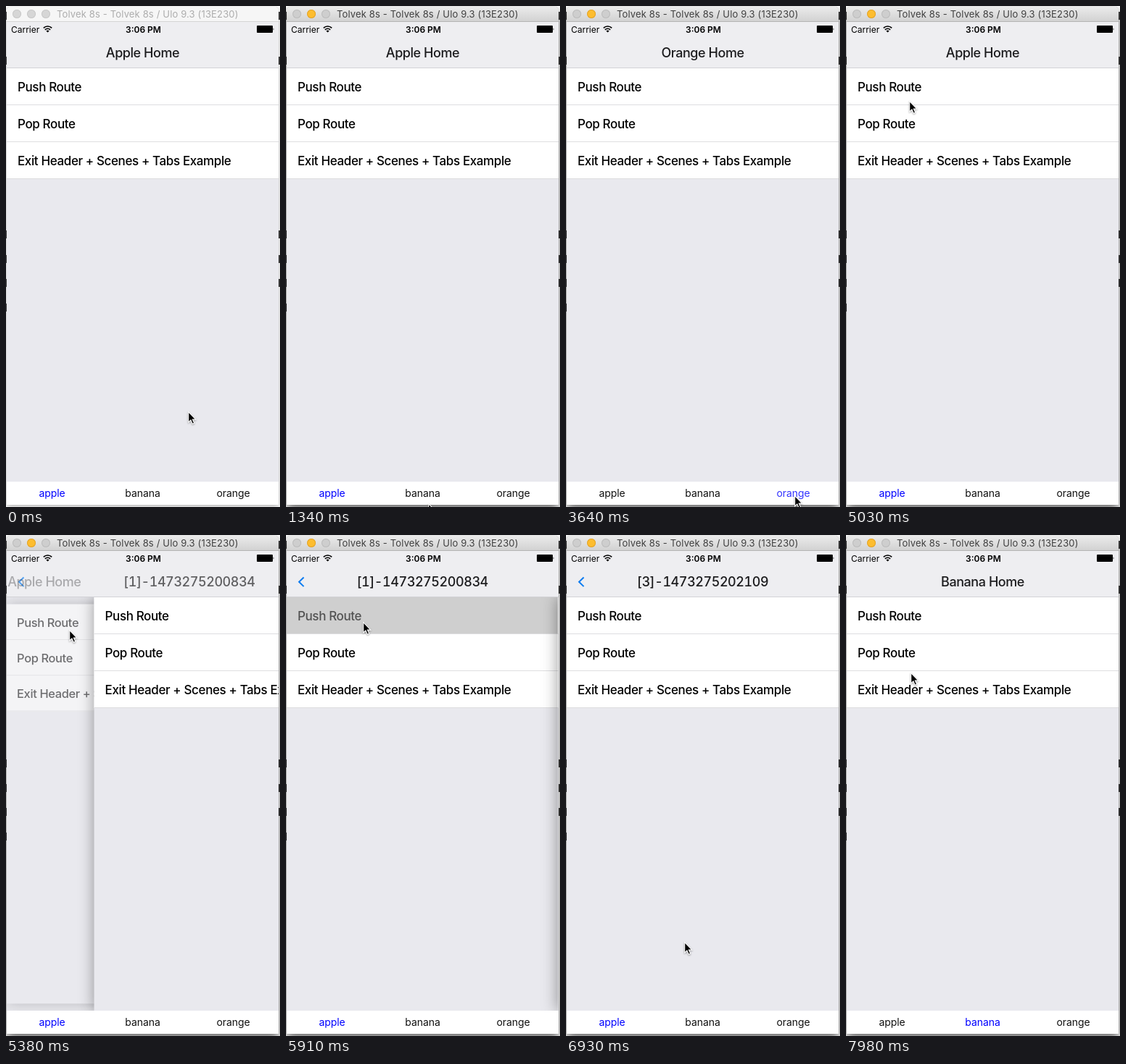
Write an HTML page that moves like this. It is 378 px wide and 692 px high and loops after 8 s.

```html
<!DOCTYPE html>
<html lang="en">
<head>
<meta charset="utf-8">
<style>
html, body { margin: 0; width: 100%; height: 100%; overflow: hidden; background: #fff; }
body { position: relative; font-family: Inter, Roboto, sans-serif; color: #000; }
div, svg { position: absolute; box-sizing: border-box; white-space: nowrap; }
.ink { width: 2px; height: 11px; background: #444; }
#win { left: 1px; top: 1px; width: 375px; height: 688px; border-radius: 5px 5px 0 0;
  box-shadow: 0 0 1px rgba(0,0,0,.4), 0 4px 9px rgba(0,0,0,.25); }
#win.on { box-shadow: 0 0 1px rgba(0,0,0,.55), 0 8px 14px rgba(0,0,0,.55); }
#bar { width: 375px; height: 21px; border-radius: 5px 5px 0 0; background: #f6f6f6;
  border-bottom: 1px solid #d4d4d4; font: 13px/21px Inter, sans-serif; letter-spacing: .15px; color: #acacac; }
.on #bar { background: linear-gradient(#ebebeb, #d2d2d2); border-color: #b4b4b4; color: #3f3f3f; }
#bar b { position: absolute; top: 4px; width: 12px; height: 12px; border-radius: 6px; background: #d6d6d6;
  box-shadow: inset 0 0 0 1px #c9c9c9; }
.on #bar b { background: #cecece; box-shadow: inset 0 0 0 1px #bcbcbc; }
.on #bar b:nth-child(2) { background: #fdbd2f; box-shadow: inset 0 0 0 1px #e2a32a; }
#head { top: 21px; width: 375px; height: 64px; background: #eeeef1; border-bottom: 1px solid #d2d2d6; overflow: hidden; }
.status { top: 0; font-size: 12px; line-height: 21px; }
.title { top: 32px; width: 375px; text-align: center; font: 500 18px/21px Inter, sans-serif;
  font-variant-numeric: tabular-nums; letter-spacing: -.45px; color: #1c1c1e; }
#scenes { top: 85px; width: 375px; height: 571px; overflow: hidden; background: #e9e9ee; }
.card { width: 375px; height: 571px; background: #e9e9ee; box-shadow: 0 0 20px rgba(0,0,0,.4); }
.row { width: 375px; height: 51px; padding: 1px 0 0 15px; background: #fff; border-bottom: 1px solid #dedee0;
  font: 500 17px/51px Inter, sans-serif; letter-spacing: -.38px; }
.row.hit { background: #cfcfcf; color: #525252; }
#tabs { top: 656px; width: 375px; height: 32px; background: #fff; }
.tab { width: 125px; text-align: center; font-size: 14px; line-height: 32px; letter-spacing: -.08px; color: #111; }
#cursor { left: 0; top: 0; overflow: visible; filter: drop-shadow(0 1px 1px rgba(0,0,0,.35)); }
</style>
</head>
<body>
<div id="win">
  <div id="bar"><b style="left:8px"></b><b style="left:28px"></b><b style="left:48px"></b>
    <div style="left:69px">Tolvek 8s - Tolvek 8s / Ulo 9.3 (13E230)</div></div>
  <div id="head">
    <div class="status" style="left:6px">Carrier</div>
    <svg style="left:50px;top:4px" width="13" height="12" fill="none" stroke="#000" stroke-width="1.7">
      <path d="M.8 4.4a8 8 0 0 1 11.4 0M2.9 6.8a5 5 0 0 1 7.2 0"/><path d="M6.5 10.6L4.4 8.5a3 3 0 0 1 4.2 0z" fill="#000" stroke="none"/></svg>
    <div class="status" style="left:1px;width:375px;text-align:center;font-weight:600">3:06 PM</div>
    <svg style="left:345px;top:5px" width="25" height="11">
      <rect width="22" height="10" rx="1"/><path d="M22.7 3.3q1.6 1.7 0 3.4z"/></svg>
    <svg id="back" style="left:14px;top:35px" width="12" height="16">
      <path d="M9.5 1.5L3 7.8l6.5 6.3" fill="none" stroke="#0b7cf0" stroke-width="2"/></svg>
  </div>
  <div id="scenes"></div>
  <div id="tabs"></div>
</div>
<svg id="cursor" width="14" height="20">
  <path d="M.7.7v14.2l3.2-2.9 2.3 5.3 2.5-1.1-2.3-5.1h4.4z" stroke="#fff" stroke-width="1.1"/></svg>
<script>
const $ = id => document.getElementById(id);
const add = (parent, cls, text = '') => {
  const el = document.createElement('div');
  el.className = cls;
  el.textContent = text;
  return parent.appendChild(el);
};
const clamp = v => Math.min(1, Math.max(0, v));
const ease = v => { v = clamp(v); return v * v * (3 - 2 * v); };

// slivers of text lines on the page behind the window
for (const y of [8, 70, 310, 344, 377, 411]) {
  for (const x of y > 400 ? [-1] : [-1, 376]) {
    const el = add(document.body, 'ink');
    el.style.left = x + 'px';
    el.style.top = y + 'px';
    document.body.prepend(el);
  }
}

const fruits = ['apple', 'banana', 'orange'];
const tabs = fruits.map((name, i) => {
  const el = add($('tabs'), 'tab', name);
  el.style.left = i * 125 + 'px';
  return el;
});
const titles = ['', '[1]-1473275200834', '[2]-1473275201526', '[3]-1473275202109'].map(s => add($('head'), 'title', s));
const cards = titles.map(() => {
  const card = add($('scenes'), 'card');
  ['Push Route', 'Pop Route', 'Exit Header + Scenes + Tabs Example'].forEach((s, i) => {
    add(card, 'row', s).style.top = i * 51 + 'px';
  });
  return card;
});

const hold = 120, glide = 260;
const taps = [[2620, 1], [3420, 2], [4060, 0], [7540, 1]]; // press time, tab
const pushes = [5207, 5904, 6455];
const stops = [ // arrival time, x, y
  [0, 251, 560], [600, 227, 571], [1340, 196, 687], [1720, 193, 676], [3210, 315, 676], [3910, 89, 676],
  [4670, 103, 182], [5030, 87, 131], [5700, 106, 120], [6930, 163, 562], [7250, 185, 680], [7980, 89, 190]];

function pointAt(t) {
  let x, y;
  for (const [end, toX, toY] of stops) {
    const k = ease((t - end + glide) / glide);
    x = x === undefined ? toX : x + (toX - x) * k;
    y = y === undefined ? toY : y + (toY - y) * k;
  }
  return [x, y];
}

function draw(t) {
  $('win').className = t >= 300 ? 'on' : '';

  let active = 0;
  const fade = [1, 1, 1];
  for (const [start, tab] of taps) {
    const dt = t - start;
    if (dt < 0) continue;
    if (dt >= hold) active = tab;
    fade[tab] = dt < hold ? 1 - .8 * ease(dt / hold) : .2 + .8 * ease((dt - hold) / 150);
  }
  tabs.forEach((el, i) => {
    el.style.opacity = fade[i];
    el.style.color = i === active ? '#00f' : '';
  });

  const pos = active ? 0 : pushes.reduce((sum, s) => sum + ease((t - s) / 280), 0);
  const name = fruits[active];
  titles[0].textContent = name[0].toUpperCase() + name.slice(1) + ' Home';
  titles.forEach((el, i) => {
    el.style.opacity = clamp(1 - Math.abs(pos - i));
    el.style.transform = `translateX(${200 * (i - pos)}px)`;
  });
  $('back').style.opacity = clamp(pos);

  cards.forEach((el, i) => {
    const ahead = clamp(i - pos), behind = clamp(pos - i);
    el.style.visibility = ahead === 1 || behind === 1 ? 'hidden' : 'visible';
    el.style.opacity = 1 - .7 * behind;
    el.style.transform = `translateX(${375 * ahead - 10 * behind}px) scale(${1 - .05 * behind})`;
    const since = t - pushes[i];
    el.firstChild.className = since >= 0 && since < 130 ? 'row hit' : 'row';
  });

  const [x, y] = pointAt(t);
  $('cursor').style.transform = `translate(${Math.round(x)}px,${Math.round(y)}px)`;
}

function tick() {
  draw(performance.now() % 8000);
  requestAnimationFrame(tick);
}
tick();
</script>
</body>
</html>
```
